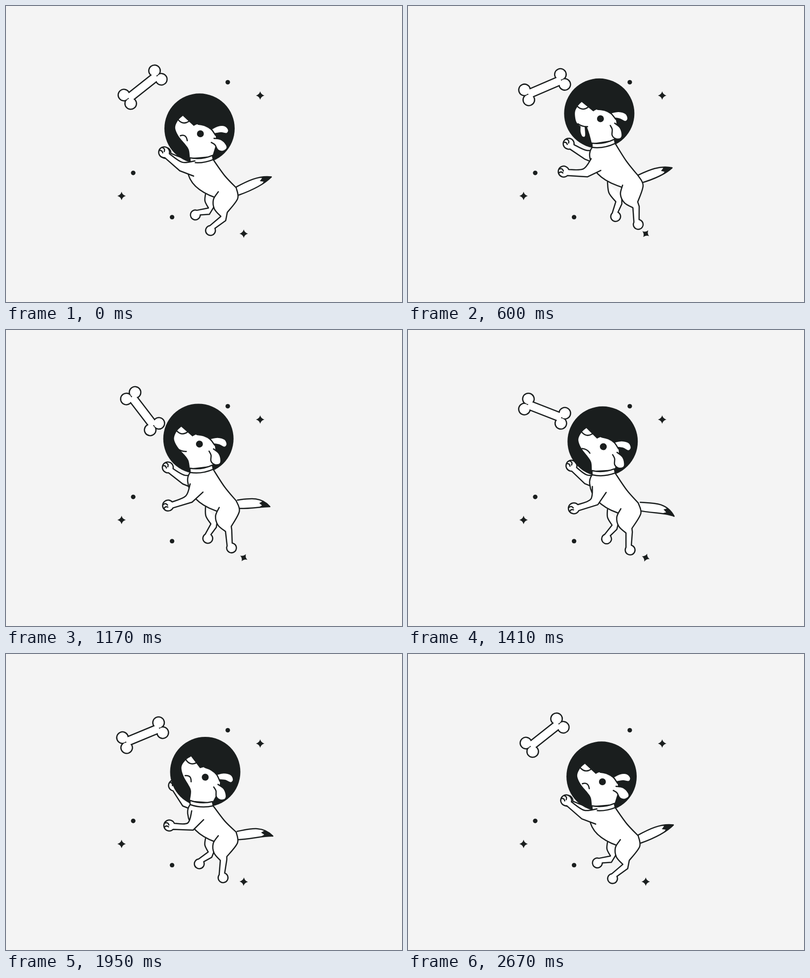
Recreate the animation shown at these times as an HTML page with a canvas. Size 800 px wide and 600 px high, loop 2.7 s.

```html
<!DOCTYPE html>
<html lang="en">
<head>
<meta charset="utf-8">
<title>Space dog</title>
<style>
html, body { margin: 0; width: 100%; height: 100%; overflow: hidden; background: #f4f4f4; }
canvas { display: block; width: 800px; height: 600px; }
</style>
</head>
<body>
<canvas id="stage" width="800" height="600"></canvas>
<script>
const ctx = document.getElementById('stage').getContext('2d');
const INK = '#1a1e1e', PAPER = '#f4f4f4', LOOP = 2700, STEP = 30;
const BEATS = [0, 360, 870, 1170, 1650, 1950, LOOP];

// Smooth track through the key poses; it rests at turning points and at the loop's seam.
function poses(...rows) {
  rows.push(rows[0]);
  const slope = (i, k) => (rows[i + 1][k] - rows[i][k]) / (BEATS[i + 1] - BEATS[i]);
  const speed = (i, k) => {
    if (i === 0 || i === rows.length - 1) return 0;
    const a = slope(i - 1, k), b = slope(i, k);
    return a * b <= 0 ? 0 : 2 * a * b / (a + b);
  };
  return t => {
    const i = BEATS.findIndex(beat => beat > t) - 1;
    const d = BEATS[i + 1] - BEATS[i], u = (t - BEATS[i]) / d, v = 1 - u;
    return rows[i].map((a, k) =>
      a * v * v * (1 + 2 * u) + rows[i + 1][k] * u * u * (3 - 2 * u) +
      d * u * v * (v * speed(i, k) - u * speed(i + 1, k)));
  };
}

// helmet height, head tilt, ear angle
const headPose = poses([248.3, 0, 40], [224.3, -2, 63], [214.5, -5.5, 74],
  [220.5, -2, 70], [231.5, 6, 69], [239, 10, 66]);
// elbow x, elbow y, forearm angle, upper arm angle
const nearArm = poses([351, 334, 230, 21], [357, 349, 215, -17], [369, 343, 173, -33],
  [376, 349, 172, -43], [388, 357, 171, -64], [378, 357, 191, -45]);
// elbow y, forearm angle
const farArm = poses([326, 219], [310, 227], [311, 220], [312, 228], [310, 239], [308, 247]);
// thigh turn, near shin angle, far shin angle
const legPose = poses([0, 126, 152], [-23, 83, 92], [-12, 67, 90],
  [-9, 70, 102], [-3, 81, 120], [1, 81, 127]);
// tip x, tip y, bend
const tailPose = poses([536, 346.5, -2], [524.5, 318, -2], [544, 346, -3],
  [533, 358, -9], [542, 391, -14], [539, 369, -11]);

const rad = deg => deg * Math.PI / 180;
const mix = (a, b, u) => a + (b - a) * u;
const mixAll = (a, b, u) => a.map((v, i) => mix(v, b[i], u));
const smooth = (t, from, to) => {
  const u = Math.min(1, Math.max(0, (t - from) / (to - from)));
  return u * u * (3 - 2 * u);
};
const go = ([x, y], length, deg) =>
  [x + length * Math.cos(rad(deg)), y + length * Math.sin(rad(deg))];

// Turns flat x, y pairs and moves them to x, y.
function spin(pts, deg, x, y) {
  const c = Math.cos(rad(deg)), s = Math.sin(rad(deg));
  return pts.map((v, i) => i % 2 ? y + pts[i - 1] * s + v * c : x + v * c - pts[i + 1] * s);
}

function fill(path, colour = '#fff') {
  ctx.fillStyle = colour;
  ctx.fill(path);
}
function line(path, width = 2.5) {
  ctx.lineWidth = width;
  ctx.stroke(path);
}
function draw(path) {
  fill(path);
  line(path);
}
function at(x, y, deg, paint) {
  ctx.save();
  ctx.translate(x, y);
  ctx.rotate(rad(deg));
  paint();
  ctx.restore();
}

// Adds a smooth curve through flat x, y pairs.
function curve(path, pts) {
  const n = pts.length / 2;
  const p = (i, k) => pts[2 * Math.max(0, Math.min(n - 1, i)) + k];
  path.lineTo(pts[0], pts[1]);
  for (let i = 0; i < n - 1; i++) {
    const a = k => p(i, k) + (p(i + 1, k) - p(i - 1, k)) / 6;
    const b = k => p(i + 1, k) - (p(i + 2, k) - p(i, k)) / 6;
    path.bezierCurveTo(a(0), a(1), b(0), b(1), p(i + 1, 0), p(i + 1, 1));
  }
  return path;
}
const through = pts => curve(new Path2D(), pts);

function dot(x, y, r = 4.6) {
  const p = new Path2D();
  p.arc(x, y, r, 0, 7);
  fill(p, INK);
}

function star(x, y, deg = 0) {
  at(x, y, deg, () => fill(new Path2D(
    'M0-8.5Q1.8-1.8 8.5 0Q1.8 1.8 0 8.5Q-1.8 1.8-8.5 0Q-1.8-1.8 0-8.5Z'), INK));
}

// The bone winds up slowly, then spins half a turn and eases out.
function boneTurn(t) {
  const release = 610;
  return t < release
    ? mix(-38.5, -23, (t / release) ** 1.4)
    : mix(-218.5, -23, (1 - (t - release) / (LOOP - release)) ** 2.45);
}
function bone(deg) {
  const p = new Path2D();
  p.rect(-36, -7.6, 72, 15.2);
  for (const x of [-39.5, 39.5]) for (const y of [-11, 11]) {
    p.moveTo(x + 10.4, y);
    p.arc(x, y, 10.4, 0, 2 * Math.PI);
  }
  at(276, 164.5, deg, () => { line(p, 5); fill(p); });
}

// Round paw, left open towards the limb.
function paw(path, [x, y], r, deg, gap) {
  path.arc(x, y, r, rad(deg - gap), rad(deg + gap), true);
}

function arm(elbow, reach, fore, upper) {
  const hand = go(elbow, reach, fore), back = fore - 180, gap = 34;
  const bend = go(elbow, 18, (fore - 360 + upper) / 2 - 20);
  const p = through([...go(bend, 26, upper - 27), ...bend, ...go(hand, 11, back - gap)]);
  paw(p, hand, 11, back, gap);
  p.lineTo(...elbow);
  p.lineTo(...go(elbow, 30, upper));
  draw(p);
  at(...hand, back, () => line(new Path2D('M-10-3Q-4-7-1-1M-9 5Q-6 0-1 3')));
}

// front runs down to the knee, rear runs up from the hock
function leg(front, rear, shin, length, hockTurn) {
  const knee = front.slice(-2), foot = go(knee, length, shin);
  const p = through(front);
  paw(p, foot, 9.9, shin + 172, 36);
  p.lineTo(...go(knee, 13, shin - hockTurn));
  curve(p, rear);
  draw(p);
}

function drawTail(x, y, [tx, ty, bend]) {
  const L = Math.hypot(tx - x, ty - y);
  const p = new Path2D(), tip = new Path2D();
  p.moveTo(0, -8.5);
  p.bezierCurveTo(L * .35, bend * .3 - 10.5, L * .7, bend - 11, L, 0);
  p.bezierCurveTo(L * .75, bend + 10, L * .38, bend * .3 + 10.5, 0, 8.5);
  for (let i = -2; i <= 2; i++) tip.lineTo(L * (i % 2 ? .76 : .67), bend * .6 + i * 4);
  tip.lineTo(L, 30);
  tip.lineTo(L, -40);
  at(x, y, Math.atan2(ty - y, tx - x) * 180 / Math.PI, () => {
    fill(p);
    ctx.save();
    ctx.clip(p);
    fill(tip, INK);
    ctx.restore();
    line(p);
  });
}

function drawHead(t, [hy, tilt, ear], hx, yl, yr) {
  const ex = hx + 1.7 - tilt * .17, ey = hy + 10.7;
  const open = smooth(t, 60, 320) - smooth(t, 900, 1140);
  const smile = smooth(t, 60, 320) - smooth(t, 1220, 1560);
  const place = pts => spin(pts, tilt, ex, ey);

  dot(hx, hy, 71);
  if (open > .02) {
    fill(through([-40, 13, -40, 27, -36, 36, -31, 34, -32, 15].map((v, i) =>
      i % 2 ? ey + 13 + (v - 13) * open : ex + v)));
  }
  at(...place([26.5, -6]), (ear - 40) * .6, () =>
    draw(through([-5, -3, 8, -9.8, 23, -10.3, 30.5, -2, 27, 5.5, 15, 4, 3, 6])));

  const jaw = mixAll([-23.5, 32, -31.5, 20, -42.5, 7, -49.5, -6],
    [-24.5, 29, -28.5, 14, -40, 13, -49, 3], open);
  const brow = place([-13.5, -16, -4.5, -19.5, 9.5, -16.5, 22, -9, 30.5, 3, 32, 20]);
  const face = new Path2D();
  face.moveTo(...place([-35.5, -36.5]));
  curve(face, brow);
  face.lineTo(417, yr - 7);
  curve(face, [371.5, yl - 8, ...place(jaw.slice(0, 4))]);
  curve(face, place([...jaw.slice(2), -50.5, -16, -44.5, -28, -35.5, -36.5]));
  fill(face);
  line(through(brow.slice(2, 10)));

  at(ex, ey, tilt, () => {
    dot(0, 0, 7);
    line(new Path2D('M-44.5-28Q-35-17.5-23.5-25'));
    const [x, y, ...rest] = mixAll([-40.5, 4, -28.5, 0, -26.5, 14], [-46, 7, -38, 14, -27, 14], smile);
    const mouth = new Path2D();
    mouth.moveTo(x, y);
    mouth.quadraticCurveTo(...rest);
    line(mouth);
  });

  at(...place([25, 11]), ear, () => draw(through(
    [.8, -3, 13.2, -10.2, 27.5, -9.4, 34, -3.9, 31.5, 5.5, 22.2, 10.2, 11, 6, 2, 7])));
}

function drawBody(hip, yl, yr) {
  const [x, y] = hip, neck = [418.5, yr];
  const spine = [...hip, (x + neck[0]) / 2, (y + yr) / 2 + 4, ...neck];
  const belly = new Path2D();
  belly.moveTo(372, yl);
  belly.quadraticCurveTo(366, yl + 8, 367, yl + 18);
  belly.quadraticCurveTo(371, y + 1, x - 42, y + 20);
  belly.lineTo(x - 28, y + 25);
  fill(curve(new Path2D(belly), spine));
  line(belly);
  line(through(spine));

  const sag = (yl + yr) / 2 + 7;
  const collar = new Path2D();
  collar.moveTo(371.5, yl - 8.5);
  collar.quadraticCurveTo(395, sag - 8.5, 417, yr - 8.5);
  collar.lineTo(418.5, yr);
  collar.quadraticCurveTo(395, sag, 372, yl);
  collar.closePath();
  draw(collar);
}

function drawDog(t, pose) {
  const [hy, tilt] = pose, [turn, nearShin, farShin] = legPose(t);
  const hip = [465, 341.4 + .8 * (hy - 214.5)];
  const neck = hy + 65.5 + .2 * tilt, slant = 2.5 - .37 * tilt;
  const yl = neck + slant, yr = neck - slant;
  const thigh = (pts, share = 1) => spin(pts, turn * share, ...hip);

  drawTail(467, hip[1] + 7, tailPose(t));
  leg([...thigh([-62, 13], 0), ...thigh([-63, 27], .4), ...thigh([-56, 41], .7)],
    thigh([-42, 34], .7), farShin, 30, 70);
  const [farElbow, farFore] = farArm(t);
  arm([357, farElbow], 45, farFore, 22);
  drawHead(t, pose, 391 + 1.15 * tilt, yl, yr);
  drawBody(hip, yl, yr);
  leg(thigh([-36, 8, -46, 24, -44, 43, -31, 58]),
    [...thigh([-18, 50, 3, 22]), ...hip], nearShin, 35.5, 85);
  const [ex, ey, fore, upper] = nearArm(t);
  arm([ex, ey], 49, fore, upper);
}

function render(t) {
  ctx.fillStyle = PAPER;
  ctx.fillRect(0, 0, 800, 600);
  ctx.strokeStyle = INK;
  ctx.lineCap = ctx.lineJoin = 'round';

  const pose = headPose(t), rise = (248.3 - pose[0]) / 33.8;
  dot(448, 154.5);
  dot(257, 338.3);
  dot(335.5, 428);
  star(513.5, 181.5);
  star(233.5, 385);
  star(480.3, 461.5, 45 * rise * rise);
  bone(boneTurn(t));
  drawDog(t, pose);
}

const start = performance.now();
function tick() {
  const t = (performance.now() - start) % LOOP;
  render(Math.floor(t / STEP) * STEP);
  requestAnimationFrame(tick);
}
tick();
</script>
</body>
</html>
```
